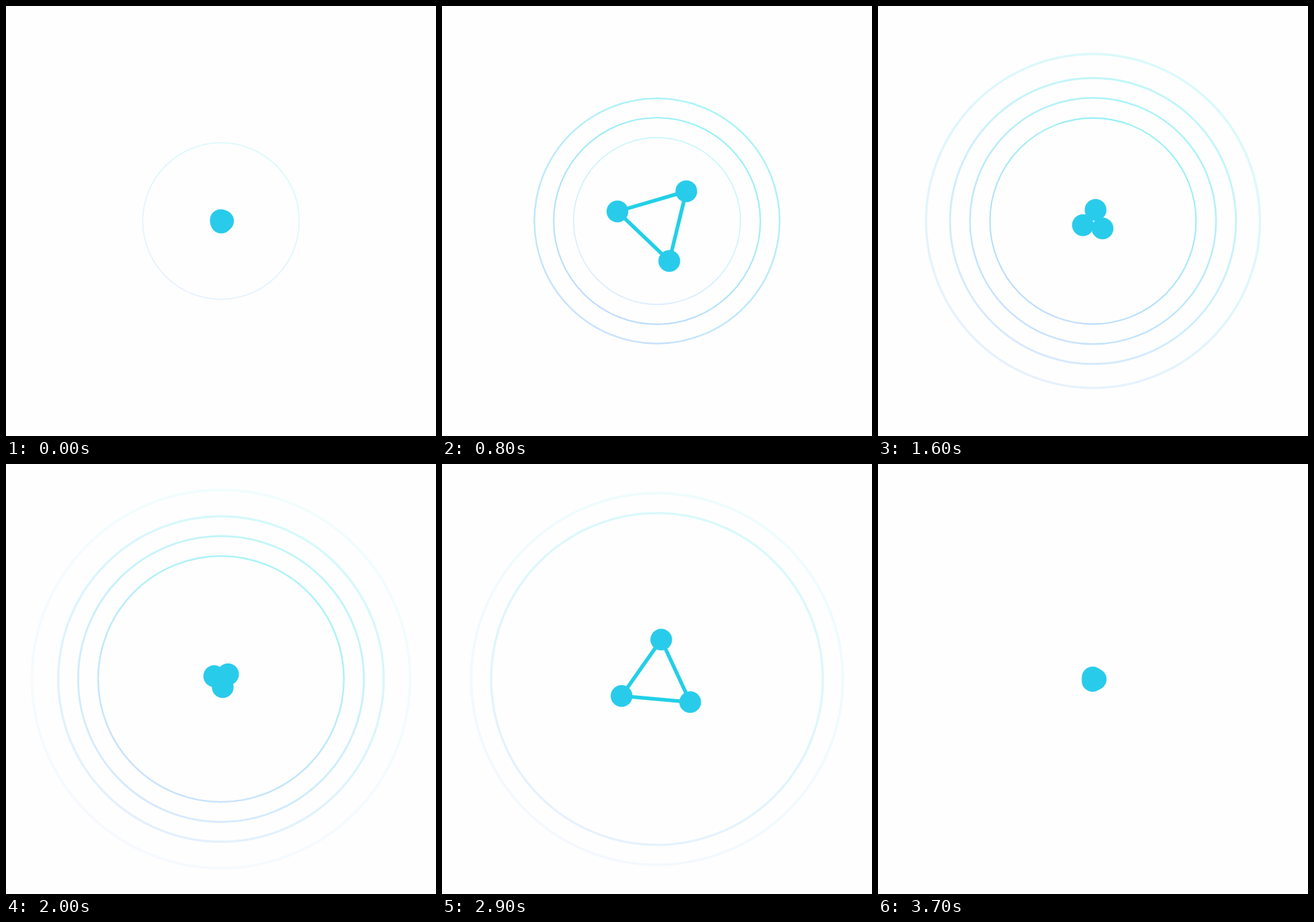
These frames come from a looping animation (640x640 px, 3800 ms). An HTML page with a canvas:

```html
<!DOCTYPE html>
<html lang="en">
<head>
<meta charset="utf-8">
<title>Pulse</title>
<style>
  html, body { margin: 0; width: 100%; height: 100%; overflow: hidden; background: #fefefe; }
  canvas { display: block; width: 640px; height: 640px; }
</style>
</head>
<body>
<canvas id="stage" width="640" height="640"></canvas>
<script>
const ctx = document.getElementById('stage').getContext('2d');
const LOOP = 3800;
const HOLD = 100;
const TAU = Math.PI * 2;

// Radius at the start of the loop and growth per tick (15 ticks a second)
const rings = [
  { start: 116.5, speed: 5.5 },
  { start: 94.9, speed: 4.91 },
  { start: 65.2, speed: 4.915 },
  { start: 35.3, speed: 4.92 }
];

// Fades in from 97 to 150, then out until 300
function ringAlpha(r) {
  return 0.45 * Math.max(0, Math.min((r - 97) / 53, (300 - r) / 150));
}

function drawRing(r) {
  const alpha = ringAlpha(r);
  if (!alpha) return;
  const dx = r * 0.5, dy = r * 0.87;
  const paint = ctx.createLinearGradient(320 + dx, 320 - dy, 320 - dx, 320 + dy);
  paint.addColorStop(0, 'rgb(15,225,232)');
  paint.addColorStop(1, 'rgb(105,172,252)');
  ctx.globalAlpha = alpha;
  ctx.strokeStyle = paint;
  ctx.lineWidth = r * 0.0135;
  ctx.beginPath();
  ctx.arc(320, 320, r, 0, TAU);
  ctx.stroke();
  ctx.globalAlpha = 1;
}

function drawNodes(tick) {
  const u = tick % 28;
  const spread = Math.min(2 + 4.97 * u, 129.4 - 4.68 * u);
  const turn = (108 - tick * 720 / 56) * Math.PI / 180;
  const nodes = [0, 1, 2].map(i => {
    const a = turn + i * TAU / 3;
    return [321 + spread * Math.cos(a), 320.3 + spread * Math.sin(a)];
  });

  ctx.strokeStyle = '#22cfe8';
  ctx.lineWidth = 5.5;
  ctx.beginPath();
  nodes.forEach(([x, y]) => ctx.lineTo(x, y));
  ctx.closePath();
  ctx.stroke();

  ctx.fillStyle = '#29cbeb';
  for (const [x, y] of nodes) {
    ctx.beginPath();
    ctx.arc(x, y, 16.2, 0, TAU);
    ctx.fill();
  }
}

function draw(ms) {
  // The picture holds for 100 ms and shows the last full tick
  const tick = Math.floor(Math.floor(ms / HOLD) * 1.5);
  ctx.fillStyle = '#fefefe';
  ctx.fillRect(0, 0, 640, 640);
  rings.forEach(({ start, speed }) => drawRing(start + speed * tick));
  drawNodes(tick);
}

const begin = performance.now();
function loop() {
  draw((performance.now() - begin) % LOOP);
  requestAnimationFrame(loop);
}
draw(0);
requestAnimationFrame(loop);
</script>
</body>
</html>
```
